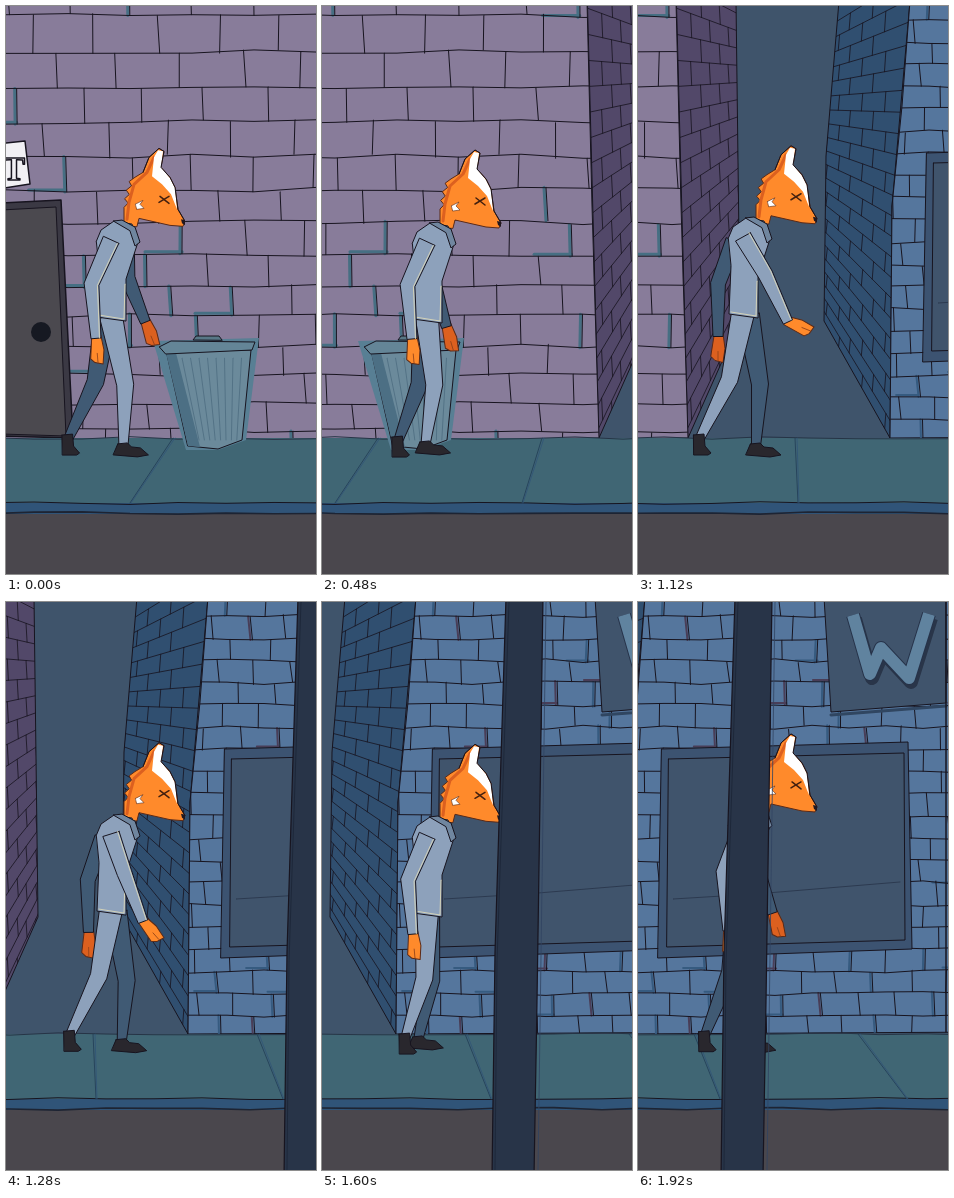
Write an HTML page with a canvas that moves like this. It is 310 px wide and 568 px high and loops after 2080 ms.

```html
<!DOCTYPE html>
<html lang="en">
<head>
<meta charset="utf-8">
<title>Night walk</title>
<style>
html, body { margin: 0; width: 100%; height: 100%; overflow: hidden; background: #3f546b; }
canvas { display: block; }
</style>
</head>
<body>
<canvas id="stage" width="310" height="568"></canvas>
<script>
const ctx = document.getElementById('stage').getContext('2d');
const STEP = 160, STEPS = 13, END = 960;
const INK = '#17141f', TEAL = '#466f83', ALLEY = '#3f546b';
const SUIT = '#8da1bb', SHADE = '#405a74', CREAM = '#e5dfb8';
const FUR = '#ff8a2b', DARK_FUR = '#dc601f', FUR_INK = '#5a2a18';

const mix = (a, b, t) => a + (b - a) * t;
const range = (n, f) => Array.from({ length: n }, (_, i) => f(i));
const rand = (a, b) => {
  const v = Math.sin(a * 127.1 + b * 311.7) * 43758.5453;
  return v - Math.floor(v);
};

function path(pts, closed) {
  ctx.beginPath();
  for (let i = 0; i < pts.length; i += 2) ctx.lineTo(pts[i], pts[i + 1]);
  if (closed) ctx.closePath();
}
function line(pts, color = INK, width = 1) {
  path(pts);
  ctx.strokeStyle = color;
  ctx.lineWidth = width;
  ctx.stroke();
}
function shape(pts, fill, stroke = INK, width = 1) {
  path(pts, true);
  ctx.fillStyle = fill;
  ctx.fill();
  if (!stroke) return;
  ctx.strokeStyle = stroke;
  ctx.lineWidth = width;
  ctx.stroke();
}
function rect(x, y, w, h, fill) {
  ctx.fillStyle = fill;
  ctx.fillRect(x, y, w, h);
}
function at(x, y, draw) {
  ctx.save();
  ctx.translate(x, y);
  draw();
  ctx.restore();
}

// ---------- street ----------

function wall(outline, fill, drawBricks) {
  shape(outline, fill);
  ctx.save();
  path(outline, true);
  ctx.clip();
  drawBricks();
  ctx.restore();
}

// Loosely drawn courses; accent(v) maps a random value to an extra [color, width] stroke.
function bricks({ rowY, rows, x0, x1, pitch, shift, wobble, accent }) {
  const edge = (r, x) => rowY(r) + (rand(r, Math.round(x / pitch)) - .5) * wobble;
  const first = Math.floor(x0 / pitch) - 1, last = Math.ceil(x1 / pitch) + 1;
  for (let r = 0; r < rows; r++) {
    const course = [];
    for (let c = first; c <= last; c++) {
      course.push(c * pitch, edge(r, c * pitch));
      const x = c * pitch + (shift * r) % pitch + (rand(c, r + 40) - .5) * 7;
      const top = edge(r, x), foot = edge(r + 1, x), lean = (rand(c, r + 70) - .3) * 4;
      const mark = accent(rand(r + 3, c + 11));
      if (mark) {
        line([x - 2, top, x + lean - 2, foot], ...mark);
        if (rand(c, r + 9) < .5) line([x - pitch * .6, foot - 2, x, foot - 2], ...mark);
      }
      line([x, top, x + lean, foot]);
    }
    line(course);
  }
}

// Courses receding into the alley shrink towards the far edge.
function recedingBricks(near, far, pitch, top, scale) {
  for (let y = -20, r = 0; y < 440; y += pitch, r++) {
    const spot = (t, k) => [mix(near, far, t), mix(y + k, top + scale * (y + k), t)];
    line([...spot(-.25, 0), ...spot(1.25, 0)], INK, .8);
    for (let t = r % 2 ? .12 : .3; t < 1; t += .34)
      line([...spot(t, 0), ...spot(t + .02, pitch)], INK, .8);
  }
}

function buildings() {
  wall([376, -5, 436, -5, 440, 315, 388, 432], '#524869',
    () => recedingBricks(384, 439, 25, 22, .68));
  wall([539, -5, 526, 150, 524, 315, 590, 432, 592, 200, 610, -5], '#304f70',
    () => recedingBricks(594, 526, 21, 35, .65));
  wall([-10, -5, 376, -5, 381, 200, 388, 432, -10, 436], '#887c9a', () => bricks({
    rowY: r => -27 + 36.6 * r - .36 * (r - 1) ** 2, rows: 15,
    x0: 0, x1: 390, pitch: 62, shift: 25, wobble: 5,
    accent: v => v < .2 && [TEAL, 3]
  }));
  wall([610, -5, 602, 100, 592, 200, 590, 432, END, 430, END, -5], '#55769d', () => bricks({
    rowY: r => -8 + 22.2 * r, rows: 20,
    x0: 585, x1: END, pitch: 37, shift: 21, wobble: 4,
    accent: v => v < .12 ? ['#493e58', 2] : v < .24 && ['#365b80', 2]
  }));
}

function door() {
  shape([-5, 197, 55, 194, 67, 432, -5, 430], '#3b3944', INK, 1.5);
  shape([-5, 204, 50, 201, 60, 430, -5, 428], '#4b494f');
  ctx.beginPath();
  ctx.arc(35, 326, 10, 0, 7);
  ctx.fillStyle = '#161922';
  ctx.fill();
  shape([-8, 138, 19, 135, 24, 178, -8, 183], '#f1f0f4', INK, 1.5);
  ctx.font = 'bold 33px "Liberation Serif", serif';
  ctx.strokeText('T', -3, 174);
}

function bin() {
  shape([147, 335, 253, 332, 240, 434, 212, 444, 180, 444], '#587f94', null);
  shape([160, 346, 245, 344, 236, 434, 212, 443, 182, 440], '#6b8a9b');
  shape([160, 347, 170, 347, 194, 441, 182, 440], '#4c6f84', null);
  for (let i = 0; i < 8; i++)
    line([176 + i * 8.5, 352, 193 + i * 5.4, 434], '#4d6d80', .8);
  shape([187, 334, 190, 330, 213, 330, 216, 334], '#587786');
  shape([153, 341, 165, 335, 249, 336, 246, 344, 160, 348], '#648597');
}

function shopFront() {
  shape([626, 147, 873, 140, 877, 347, 623, 356], '#3c5371');
  shape([633, 157, 869, 151, 870, 338, 632, 345], '#40546c');
  line([638, 297, 720, 292, 865, 280], '#283449', .8);
  shape([789, -5, 796, 110, 911, 101, 911, -5], '#40546c');
  line([796, 113, 911, 104], '#304661', 3);
  const letter = [818, 13, 835, 72, 846, 46, 874, 76, 894, 12];
  ctx.lineCap = 'butt';
  at(2, 4, () => line(letter, '#293549', 14));
  line(letter, '#26334a', 14);
  line(letter, '#60839f', 12);
  ctx.lineCap = 'round';
  line([911, 0, 911, 430], INK, 1.5);
}

function pavement() {
  rect(-10, 500, END, 70, '#4a474d');
  rect(-10, 496, END, 12, '#305478');
  rect(-10, 432, END, 65, '#406674');
  const rule = (y, color, width) =>
    line(range(21, i => [i * 48 - 20, y + (rand(i, y) - .5) * 3]).flat(), color, width);
  rule(432, '#263446', 1);
  rule(497, INK, 1);
  rule(507, '#1d2433', 1.6);
  for (let i = 0; i < 5; i++) {
    const top = 167 + 164 * i, bottom = top - 43 + 23 * i;
    line([top, 432, bottom, 497], '#27445c');
    line([top + 2, 432, bottom + 1, 497], '#315578', .8);
  }
}

function street() {
  buildings();
  door();
  shopFront();
  pavement();
  bin();
}

function lampPost() {
  shape([700, -5, 737, -5, 731, 400, 728, 575, 686, 575, 689, 350], '#283448', INK, 1.2);
  line([703, 0, 691, 360, 689, 568], '#1b2536', .8);
  line([740, 0, 732, 568], '#304361', .8);
}

// ---------- walker ----------

// A limb tapers along its joints; returns its leading edge.
function limb(pts, widths, fill) {
  const left = [], right = [], n = widths.length;
  widths.forEach((w, i) => {
    const a = Math.max(0, i - 1) * 2, b = Math.min(n - 1, i + 1) * 2;
    const dx = pts[b] - pts[a], dy = pts[b + 1] - pts[a + 1];
    const k = w / 2 / Math.hypot(dx, dy);
    left.push(pts[i * 2] + dy * k, pts[i * 2 + 1] - dx * k);
    right.unshift(pts[i * 2] - dy * k, pts[i * 2 + 1] + dx * k);
  });
  shape([...left, ...right], fill);
  return left;
}

function arm(x, y, wx, wy, back, lift, fill, fur) {
  const ex = (x + wx) / 2 - back, ey = (y + wy) / 2 - 5;
  at(wx, wy, () => {
    ctx.rotate(Math.atan2(wy - ey, wx - ex) - Math.PI / 2 - lift);
    shape([-4, -3, 5, -3, 7, 12, 5, 26, -3, 24, -7, 20], fur, FUR_INK);
    line([0, 24, 0, 15], '#8f4119', .8);
  });
  return limb([x, y, ex, ey, wx, wy], [17, 15, 10], fill);
}

// lead runs from -1 (foot behind) to 1 (foot in front).
function leg(x, y, lead, fill) {
  const ax = 90 + 28 * lead, ay = 434 + 4 * lead;
  limb([x, y, (x + ax) / 2 + 8, (y + ay) / 2 + 5, ax, ay + 2], [23, 17, 9], fill);
  at(ax, ay, () => shape(lead > 0
    ? [-6, 0, 4, -1, 8, 3, 17, 4, 25, 11, 14, 13, -10, 11]
    : [-7, -1, 4, -2, 5, 10, 11, 17, 8, 19, -6, 19], '#29272d'));
}

function head() {
  const tufts = range(8, i => [120 + i * i / 7 + (i % 2 ? 3 : -1), 203 - i * 4.3]).flat();
  const front = [138, 168, 144, 153, 154, 144, 159, 147, 156, 163, 165, 173, 170, 183, 173, 205, 180, 217];
  shape([119, 222, ...tufts, ...front, 178, 222, 165, 221, 134, 214, 132, 222], FUR, FUR_INK);
  line([122, 215, 124, 198, 129, 180, 142, 168, 149, 153], DARK_FUR, 3);
  shape([149, 153, 153, 146, 158, 147, 156, 163, 165, 174, 170, 184, 172, 205,
    166, 190, 157, 180, 147, 172], '#fff', null);
  line(front);
  shape([130, 200, 138, 196, 135, 200, 139, 204, 132, 205], '#fff', FUR_INK, .6);
  line([155, 192, 164, 199], '#43200f', 1.5);
  line([154, 198, 164, 192], '#43200f', 1.5);
  shape([176, 215, 180, 216, 180, 221, 177, 219], '#211820', null);
}

function jacket() {
  shape([92, 238, 97, 226, 110, 217, 128, 220, 134, 238, 122, 275, 122, 317, 93, 313, 95, 265], SUIT);
  line([121, 280, 120, 315, 95, 311], CREAM, .8);
  shape([109, 217, 118, 216, 131, 223, 136, 238, 131, 242, 126, 227], '#70869f');
}

// One full stride per loop; the body rises twice as often.
function walker(step) {
  const wave = Math.cos(2 * Math.PI * (step - .5) / STEPS);
  const stride = Math.sign(wave) * Math.abs(wave) ** .7;
  const reach = Math.max(0, -wave) ** 2;
  const rise = Math.max(0, Math.cos(4 * Math.PI * (step - 5) / STEPS));
  const bob = -16 * rise - 5 * reach, bx = -2;

  arm(110 + 12 * stride + bx, 240 + bob, 110 + 30 * stride, 325 - 8 * stride + bob / 2, 8, 0, SHADE, DARK_FUR);
  leg(107 - 5 * stride + bx, 314 + bob, -stride, SHADE);
  at(-1, bob * .85, head);
  leg(107 + bx, 312 + bob, stride, SUIT);
  at(bx, bob, jacket);
  const edge = arm(107 + bx, 236 + bob, 90 + 60 * reach, 333 - 17 * reach - 5 * rise,
    12 * (1 - reach), .75 * reach ** 3, SUIT, FUR);
  at(-1.5, 0, () => line(edge, CREAM, .8));
}

// ---------- playback ----------

// The camera hurries past some stretches: [step, distance].
const track = [[0, 0], [3, 111], [5, 257], [7, 338], [9, 477], [11, 555], [12, 603]];

function scrollAt(step) {
  const i = Math.max(1, track.findIndex(k => k[0] >= step));
  const [s0, d0] = track[i - 1], [s1, d1] = track[i];
  return Math.round(mix(d0, d1, (step - s0) / (s1 - s0)));
}

function render(step) {
  const scroll = scrollAt(step);
  ctx.lineJoin = ctx.lineCap = 'round';
  rect(0, 0, 310, 568, ALLEY);
  at(-scroll, 0, street);
  walker(step);
  at(-scroll, 0, lampPost);
}

const start = performance.now();
let shown = -1;
function tick() {
  const step = Math.floor((performance.now() - start) / STEP) % STEPS;
  if (step !== shown) render(shown = step);
  requestAnimationFrame(tick);
}
tick();
</script>
</body>
</html>
```
